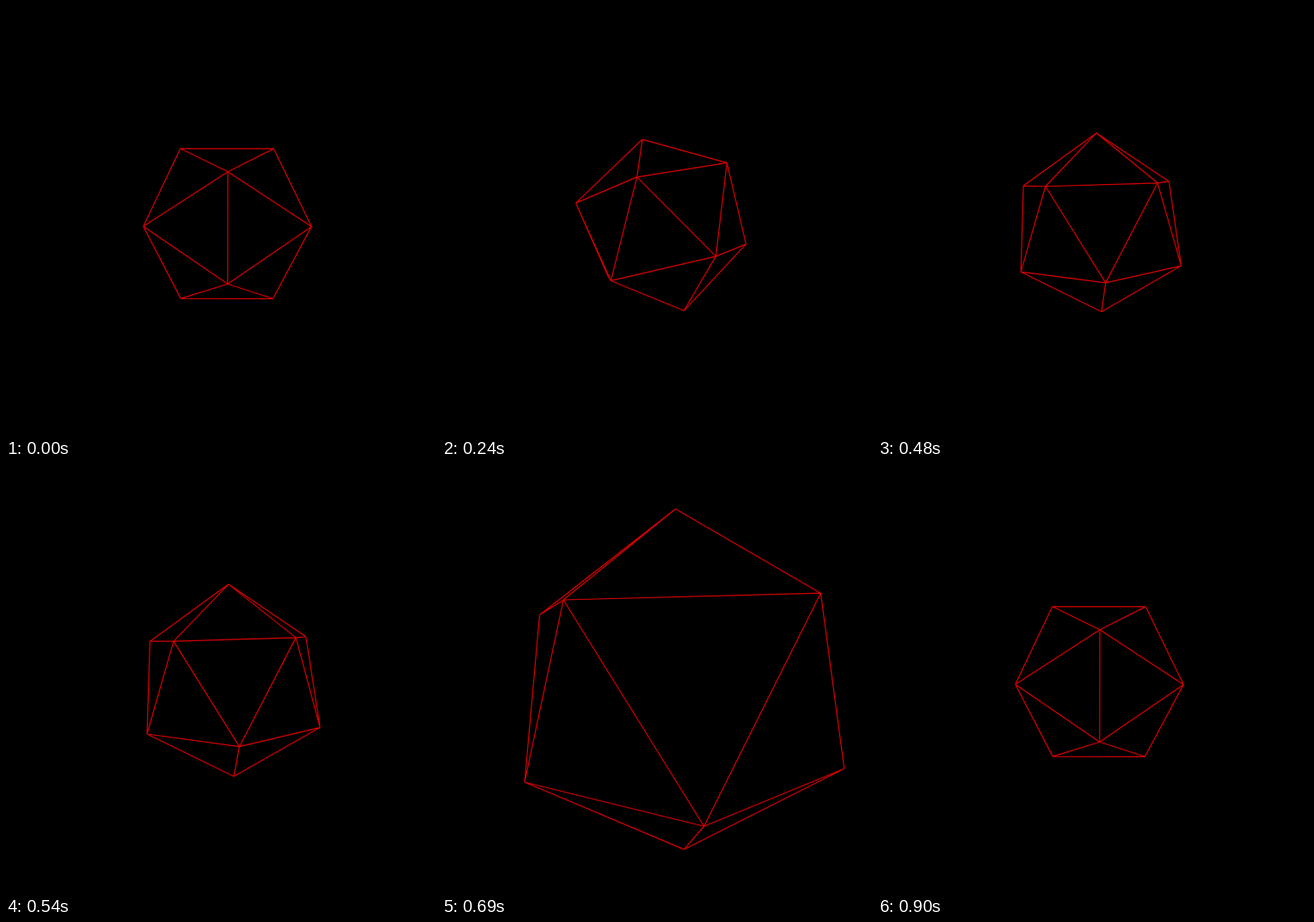
Write an HTML page with a canvas that moves like this. It is 500 px wide and 500 px high and loops after 0.93 s.

```html
<!DOCTYPE html>
<html lang="en">
<head>
<meta charset="utf-8">
<title>Icosahedron</title>
<style>
  html, body { margin: 0; width: 100%; height: 100%; overflow: hidden; background: #000; }
  canvas { display: block; }
</style>
</head>
<body>
<canvas id="stage" width="500" height="500"></canvas>
<script>
const ctx = document.getElementById('stage').getContext('2d');
const LOOP = 930, STEP = 30, RESET = 900;
const FOCAL = 500, NEAR = 0.02;
const CX = 251.5, CY = 249.1;
const PHI = (1 + Math.sqrt(5)) / 2;
const RADIUS = Math.hypot(1, PHI);

// Icosahedron with edge length 2
const verts = [];
for (const s of [-1, 1]) {
  for (const p of [-PHI, PHI]) verts.push([0, s, p], [s, p, 0], [p, 0, s]);
}
const joined = (i, j) =>
  Math.abs(Math.hypot(...verts[i].map((n, k) => n - verts[j][k])) - 2) < 1e-6;
const faces = [];
for (let i = 0; i < 12; i++)
  for (let j = i + 1; j < 12; j++)
    for (let k = j + 1; k < 12; k++)
      if (joined(i, j) && joined(j, k) && joined(i, k)) faces.push([i, j, k]);

const easeInOut = (t, start, length) => {
  const u = Math.min(1, Math.max(0, (t - start) / length));
  return u < 0.5 ? 2 * u * u : 1 - 2 * (1 - u) * (1 - u);
};
const turn = (a, b, angle) => {
  const c = Math.cos(angle), s = Math.sin(angle);
  return [a * c - b * s, a * s + b * c];
};
const dot = (a, b) => a[0] * b[0] + a[1] * b[1] + a[2] * b[2];

function rotate([x, y, z], pitch, yaw, roll) {
  [x, y] = turn(x, y, roll);
  [y, z] = turn(y, z, pitch);
  [z, x] = turn(z, x, yaw);
  return [x, y, z];
}

function draw(time) {
  const t = time >= RESET ? 0 : time;
  const spin = easeInOut(t, -15, 500);
  const dist = RADIUS * (4.874 - 4.38 * easeInOut(t, 430, 500));
  const offX = 0.1 + 0.14 * easeInOut(t, 475, 125);
  const offY = -0.083;
  const eye = [-offX, -offY, dist];

  const pts = verts.map(v => rotate(v, 0.036 + 0.047 * spin, -0.904 * spin, -0.611 * spin));
  const flat = pts.map(([x, y, z]) => {
    const k = FOCAL / Math.max(NEAR, dist - z);
    return [CX + (x + offX) * k, CY - (y + offY) * k];
  });

  // Only edges of faces turned to the eye
  const edges = new Map();
  for (const [a, b, c] of faces) {
    const normal = [0, 1, 2].map(i => pts[a][i] + pts[b][i] + pts[c][i]);
    if (dot(normal, eye) <= dot(normal, pts[a])) continue;
    for (const e of [[a, b], [b, c], [a, c]]) edges.set(e.join(), e);
  }

  ctx.fillStyle = '#000';
  ctx.fillRect(0, 0, 500, 500);
  ctx.strokeStyle = '#d80000';
  ctx.lineWidth = 1.2;
  ctx.beginPath();
  for (const [a, b] of edges.values()) {
    ctx.moveTo(...flat[a]);
    ctx.lineTo(...flat[b]);
  }
  ctx.stroke();
}

const origin = performance.now();
function tick() {
  const t = (performance.now() - origin) % LOOP;
  draw(Math.floor(t / STEP) * STEP);
  requestAnimationFrame(tick);
}
tick();
</script>
</body>
</html>
```
